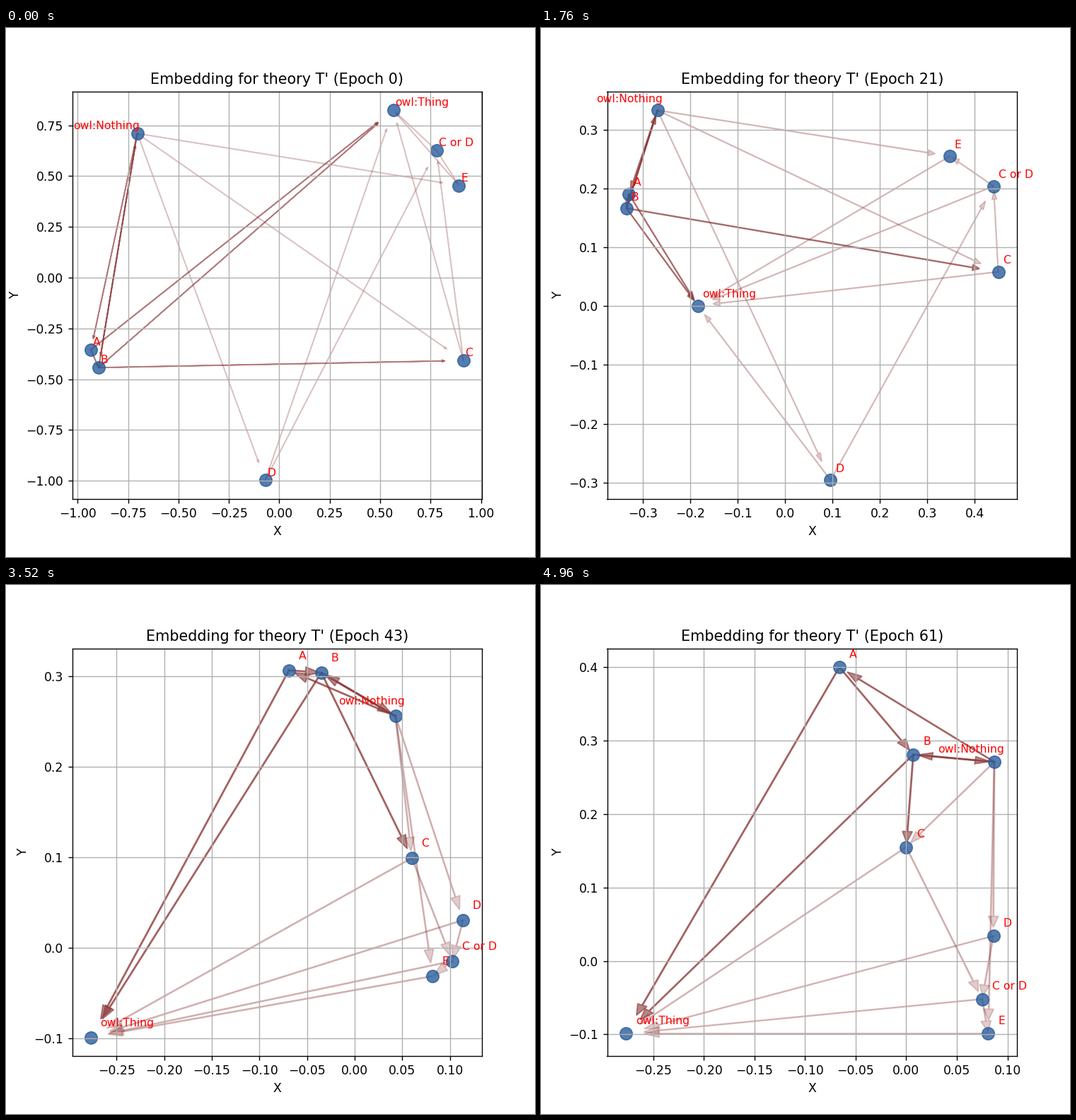
A matplotlib script for the animation above (5120 ms loop, 748 by 748 pixels).

```python
import numpy as np
import matplotlib.pyplot as plt
from matplotlib.animation import FuncAnimation

FRAMES, STEP_MS = 32, 160
BLUE = (42 / 255, 93 / 255, 155 / 255)
BROWN = (136 / 255, 52 / 255, 52 / 255)
STRONG, FAINT = 0.6, 0.25

NOTHING, THING, UNION = "owl:Nothing", "owl:Thing", "C or D"
CLASSES = ["A", "B", "C", "D", "E", UNION, THING, NOTHING]

# Every class starts on the unit circle and is trained past a few waypoints;
# a class with fewer waypoints has come to rest at its last one.
EPOCHS = np.array([0, 15, 27, 35, 61])
ROUTES = {
    "A": (200.8, -.501 + .070j, -.185 + .258j, -.072 + .269j, -.066 + .400j),
    "B": (206.3, -.501 + .068j, -.190 + .238j, -.072 + .311j, .007 + .281j),
    "C": (335.9, .578 - .024j, .317 + .097j, .115 + .083j, .000 + .155j),
    "D": (266.0, .097 - .503j, .095 - .117j, .122 + .027j, .086 + .034j),
    "E": (27.0, .512 + .358j, .203 + .133j, .083 + .023j, .081 - .099j),
    UNION: (38.8, .553 + .346j, .314 + .085j, .130 + .016j, .075 - .052j),
    THING: (55.6, -.006 + .124j, -.277 - .069j, -.277 - .099j),
    NOTHING: (134.8, -.402 + .416j, -.140 + .278j, .003 + .252j, .087 + .271j),
}


def in_sets(name):
    """Superclasses of a class, as (target, strength) pairs."""
    if name == NOTHING:
        return [(c, STRONG if c in "AB" else FAINT) for c in "ABCDE"]
    parents = {"A": "B", "C": UNION, "D": UNION, UNION: "E"}
    alpha = STRONG if name in "AB" else FAINT
    found = [(parents[name], alpha)] if name in parents else []
    if name == "B":
        found += [("C", alpha), (NOTHING, alpha)]
    return found + [(THING, alpha)] * (name != THING)


def track(values):
    """Hermite track without overshoot that comes to rest at the end."""
    d = np.diff(values) / np.diff(EPOCHS)
    a, b = d[:-1], d[1:]
    same = a * b > 0
    mid = np.where(same, 2 * a * b / np.where(same, a + b, 1), 0)
    return values, np.r_[1.5 * d[0] - 0.5 * mid[0], mid, 0]


def make_tracks(angle, *points):
    keys = [np.exp(1j * np.radians(angle)), *points]
    keys = np.array(keys + keys[-1:] * (len(EPOCHS) - len(keys)))
    return track(keys.real), track(keys.imag)


def sample(curve, epoch):
    v, m = curve
    i = min(np.searchsorted(EPOCHS, epoch, side="right"), len(EPOCHS) - 1) - 1
    h = EPOCHS[i + 1] - EPOCHS[i]
    t = (epoch - EPOCHS[i]) / h
    ease = t * t * (3 - 2 * t)
    return (v[i] + (v[i + 1] - v[i]) * ease
            + h * t * (1 - t) * ((1 - t) * m[i] - t * m[i + 1]))


TRACKS = {name: make_tracks(*route) for name, route in ROUTES.items()}
EDGES = [(c, sup, alpha) for c in CLASSES for sup, alpha in in_sets(c)]

fig, ax = plt.subplots(figsize=(6, 6), dpi=748 / 6)


def draw(frame):
    epoch = max(0, 2 * frame - 1)
    pos = {c: np.array([sample(curve, epoch) for curve in TRACKS[c]])
           for c in CLASSES}
    ax.clear()
    for start, end, alpha in EDGES:
        ax.arrow(*pos[start], *(0.95 * (pos[end] - pos[start])),
                 head_width=0.01, head_length=0.015,
                 length_includes_head=True, color=BROWN, alpha=alpha)
    ax.scatter(*zip(*pos.values()), s=100, color=[BLUE], alpha=0.8, linewidths=1)
    for name, (x, y) in pos.items():
        ax.text(x + 0.01, y + 0.01, name, color="red", fontsize=9, va="bottom",
                ha="right" if name == NOTHING else "left")
    ax.set_title(f"Embedding for theory T' (Epoch {epoch})")
    ax.set_xlabel("X")
    ax.set_ylabel("Y")
    ax.grid(True)


anim = FuncAnimation(fig, draw, frames=FRAMES, interval=STEP_MS,
                     init_func=lambda: None, repeat=True)
plt.show()
```
